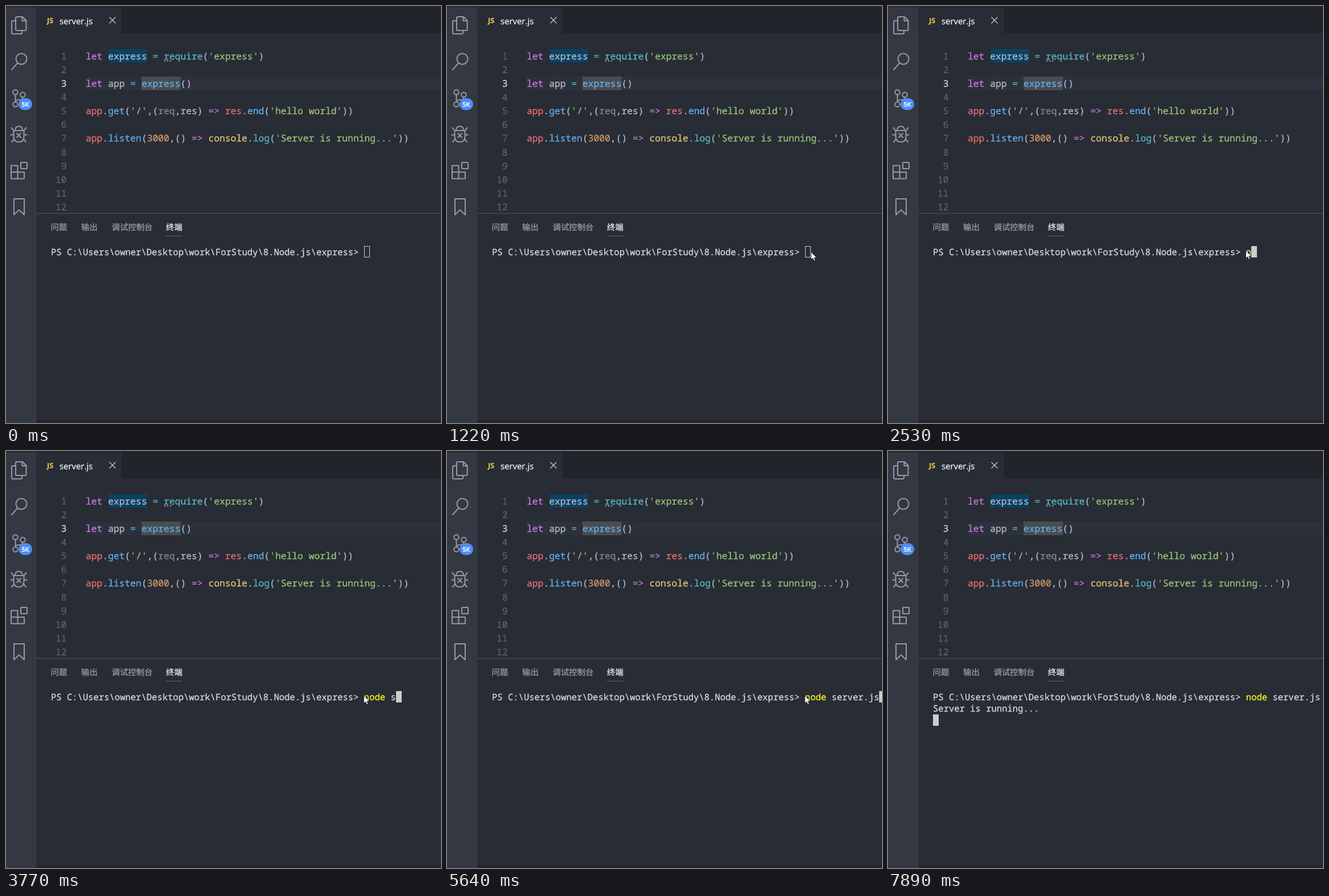
These frames come from a looping animation (764x733 px, 8000 ms). An HTML page:

```html
<!DOCTYPE html>
<html lang="zh-CN">
<head>
<meta charset="utf-8">
<title>Editor</title>
<style>
html, body { margin: 0; width: 100%; height: 100%; overflow: hidden; background: #282c34; }
svg { display: block; width: 764px; height: 733px; }
text { white-space: pre; text-rendering: geometricPrecision; }
/* A hairline in the text colour gives the letters their weight. */
text, tspan { fill: currentColor; stroke: currentColor; stroke-width: .3px; }
.code, .term { font-family: "Noto Sans Mono", "DejaVu Sans Mono", monospace; }
.code { font-size: 16.32px; color: #b4bbc8; }
.term { font-size: 15.54px; color: #d6d8dc; }
.ui { font-family: "Open Sans", "Noto Sans", sans-serif; }
.tabs { font: 14.4px "Noto Sans CJK SC", "Noto Sans CJK", sans-serif; color: #989ca4; }
.icons { fill: none; stroke: #959aa5; stroke-width: 2; stroke-linejoin: round; }
.num { color: #596072; text-anchor: end; }
.num.on { color: #d7dae0; }
.k { color: #c678dd; } .o { color: #56b6c2; } .s { color: #98c379; } .f { color: #61afef; }
.v { color: #e06c75; } .n { color: #d19a66; } .c { color: #e5c07b; } .d { color: #7f848e; }
.cmd { color: #fafa1a; }
</style>
</head>
<body>
<svg viewBox="0 0 764 733">
  <rect width="764" height="733" fill="#282c34"/>
  <rect width="764" height="48" fill="#21252b"/>
  <rect x="53" y="728" width="711" height="5" fill="#21252b"/>
  <rect y="2" width="53.5" height="731" fill="#333842"/>
  <rect x="53.5" y="2" width="150.500" height="46" fill="#282c34"/>
  <rect x="204" y="2" width="1" height="46" fill="#1b1e23"/>

  <g class="icons">
    <path d="M17 26V21Q17 19 19 19H29L35.500 25.500V41Q35.500 43 33.500 43H19Q17 43 17 41V26H12Q10 26 10 28V47Q10 49 12 49H26Q28 49 28 47V43M28.500 19.500V26H35"/>
    <circle cx="27" cy="93" r="9.500"/><path d="M20.500 100L9.500 112.500"/>
    <circle cx="16.500" cy="151.500" r="4.300"/><circle cx="29.500" cy="156" r="4.300"/><circle cx="16.500" cy="173" r="4.300"/>
    <path d="M16.500 156V168.500M29.500 160.500Q29 165 23 165Q18 165 16.500 168"/>
    <path d="M13.500 219H31.500V229Q31.500 239 22.500 239Q13.500 239 13.500 229ZM16 219Q16 211.500 22.500 211.500Q29 211.500 29 219M18.500 223.500L26.500 231.500M26.500 223.500L18.500 231.500M13.500 219L9 213.500M31.500 219L36 213.500M13.500 226.500H7.500M31.500 226.500H37.500M14.500 233.500L9.500 239.500M30.500 233.500L35.500 239.500"/>
    <path d="M9 280.500H20.500V292H32V303.500H9ZM9 292H20.500V303.500"/>
    <rect x="26" y="275" width="11" height="11" rx="1"/>
    <path d="M14 339H32V367L23 358.500L14 367Z"/>
  </g>
  <rect x="22" y="162" width="24" height="21" rx="10.500" fill="#4d8df6"/>
  <text class="ui" x="34" y="177" font-size="11" font-weight="600" color="#fff" text-anchor="middle">5K</text>

  <text class="ui" x="72" y="30" font-size="12.500" font-weight="700" color="#dcc14c">JS</text>
  <text class="ui" x="94" y="31.500" font-size="14.900" color="#f0f1f3">server.js</text>
  <path d="M181.500 19.500L192.500 30.500M192.500 19.500L181.500 30.500" stroke="#c8cbd0" stroke-width="1.300"/>

  <rect x="140" y="124" width="624" height="24" fill="#2c313c"/>
  <rect x="180" y="76" width="68" height="23.500" fill="#0b4161"/>
  <rect x="238" y="124" width="69" height="24" fill="#4b4c4f"/>
  <g id="code" class="code"></g>
  <path d="M278 96.500h2m3 0h2m3 0h2" stroke="#b4b8bf" stroke-width="2"/>

  <path d="M53.500 364.500H764" stroke="#51565f"/>
  <g class="tabs">
    <text x="78.500" y="394">问题</text><text x="132" y="394">输出</text>
    <text x="185.500" y="394">调试控制台</text><text x="281" y="394" color="#ececec">终端</text>
  </g>
  <path d="M281 404.500H310" stroke="#5d626b"/>

  <g class="term">
    <text x="79" y="438">PS C:\Users\owner\Desktop\work\ForStudy\8.Node.js\express&gt; <tspan id="cmd" class="cmd"></tspan><tspan id="arg"></tspan></text>
    <text id="reply" x="79" y="458.300">Server is running...</text>
  </g>
  <rect id="caret" stroke="#ccc"/>
  <path id="mouse" d="M0 0V13.500L3.100 10.700L5.300 15.600L7.500 14.600L5.400 9.900H9.700Z" fill="#fff" stroke="#15171b" stroke-width=".8"/>
</svg>
<script>
const LOOP = 8000, CELL = 9.324, ROW = 20.3;
const $ = id => document.getElementById(id);

// Each token: style letter, "|", text; tokens are split by "~".
const lines = [
  "k|let~| express ~o|= require~|(~s|'express'~|)",
  "",
  "k|let~| app ~o|= ~f|express~|()",
  "",
  "v|app~|.~f|get~|(~s|'/'~|,(~d|req~|,res) ~k|=>~| ~v|res~|.~f|end~|(~s|'hello world'~|))",
  "",
  "v|app~|.~f|listen~|(~n|3000~|,() ~k|=>~| ~c|console~|.~o|log~|(~s|'Server is running...'~|))"
];
const span = token => {
  const [style, body] = token.split("|");
  return `<tspan class="${style}">${body}</tspan>`;
};
let html = "";
for (let i = 0; i < 12; i++) {
  const y = 93.6 + i * 24.14;
  html += `<text class="num${i === 2 ? " on" : ""}" x="106.5" y="${y}">${i + 1}</text>`;
  if (lines[i]) html += `<text x="140" y="${y}">${lines[i].split("~").map(span).join("")}</text>`;
}
$("code").innerHTML = html;

// Time and number of characters typed.
const command = "node server.js";
const typing = [[0, 0], [2530, 1], [2610, 3], [2840, 4], [2990, 5], [3770, 6], [3940, 7],
  [4010, 8], [4640, 9], [4870, 10], [5020, 11], [5250, 12], [5480, 13], [5640, 14]];
const FOCUS = 1600, ENTER = 6100, REPLY = 6800;

// Time and pointer position; no position means hidden.
const moves = [[0]];
for (let i = 0; i <= 10; i++) {
  const left = (1 - i / 10) ** 1.7;
  moves.push([120 + 78 * i, 644 + 41 * left, 442 + 280 * left]);
}
moves.push([980, 644, 440], [1130, 643, 438], [1220, 639, 432], [1300, 627, 421],
  [1380, 617, 416], [1450, 621, 422], [1530, 626, 427], [1600, 628, 429.5],
  [7660, 613, 462], [7740, 580, 540], [7810, 537, 636], [7890]);

const at = (table, t) => table.findLast(step => step[0] <= t);
const set = (el, attrs) => { for (const k in attrs) el.setAttribute(k, attrs[k]); };

function draw(t) {
  const count = at(typing, t)[1];
  const typed = command.slice(0, count);
  $("cmd").textContent = typed.slice(0, 4);
  $("arg").textContent = typed.slice(4);
  $("reply").style.display = t >= REPLY ? "" : "none";

  const row = t >= REPLY ? 2 : t >= ENTER ? 1 : 0;
  const col = row ? 0 : 59 + count;
  const solid = t >= FOCUS;
  const inset = solid ? 0 : 0.5;
  set($("caret"), {
    x: Math.floor(79 + col * CELL) + inset, y: Math.round(422 + row * ROW) + inset,
    width: 10 - 2 * inset, height: 20 - 2 * inset,
    fill: solid ? "#ccc" : "none", "stroke-width": solid ? 0 : 1
  });

  const [, x, y] = at(moves, t);
  $("mouse").style.display = x === undefined ? "none" : "";
  if (x !== undefined) set($("mouse"), { transform: `translate(${x + 0.5} ${y + 0.5})` });
}

function tick() {
  draw(performance.now() % LOOP);
  requestAnimationFrame(tick);
}
tick();
</script>
</body>
</html>
```
